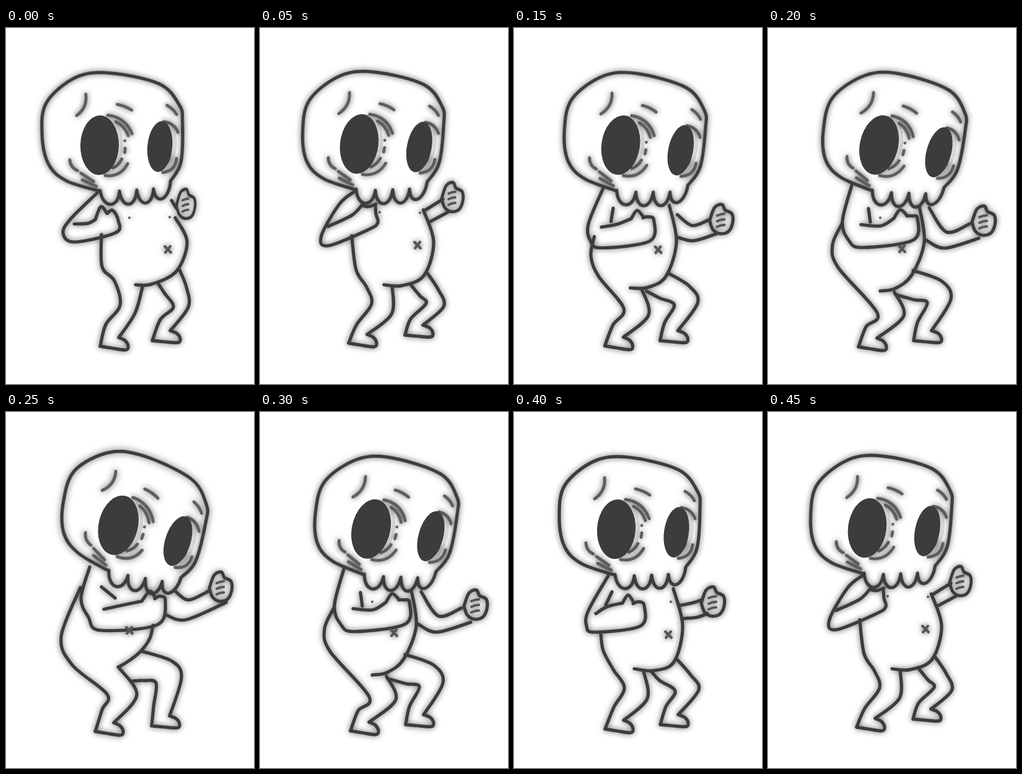
Recreate the animation shown at these times as an HTML page. Size 400x574 px, loop 0.5 s.

```html
<!DOCTYPE html>
<html lang="en">
<head>
<meta charset="utf-8">
<title>Dancing skull</title>
<style>
  html, body { margin: 0; width: 100%; height: 100%; overflow: hidden; background: #fff; }
  #strip { display: block; position: absolute; left: 0; top: 0; width: 2400px; height: 574px; animation: play .5s step-end infinite; }
  /* six poses side by side, played there and back */
  @keyframes play {
    0% { transform: translateX(0); }
    10%, 90% { transform: translateX(-400px); }
    20%, 80% { transform: translateX(-800px); }
    30%, 70% { transform: translateX(-1200px); }
    40%, 60% { transform: translateX(-1600px); }
    50% { transform: translateX(-2000px); }
  }
  path { fill: none; stroke: #3c3c3c; stroke-width: 5.2; stroke-linecap: round; stroke-linejoin: round; }
  .mark { stroke: #5c5c5c; stroke-width: 4.8; }
  .fine { stroke: #555; stroke-width: 4; }
  .glow { filter: drop-shadow(0 0 5px rgba(60, 60, 60, .85)); }
  ellipse { fill: #3c3c3c; }
  .shade { opacity: .2; }
</style>
</head>
<body>
<svg id="strip" viewBox="0 0 2400 574"></svg>
<script>
const nums = s => s.split(' ').map(Number);
const path = (d, cls = '') => `<path class="${cls}" d="${d}"/>`;

// Smooth stroke through "x y" points.
function curve(text) {
  const p = [], n = nums(text);
  while (n.length) p.push(n.splice(0, 2));
  return p.slice(1).reduce((d, b, i) => {
    const a = p[i], before = p[i - 1] || a, after = p[i + 2] || b;
    const c1 = a.map((v, k) => v + (b[k] - before[k]) / 6);
    const c2 = b.map((v, k) => v - (after[k] - a[k]) / 6);
    return d + `C${c1} ${c2} ${b}`;
  }, 'M' + p[0]);
}

// Bent line: the control point sits sideways of the middle.
function arc(x, y, u, v, bend = 0) {
  return `M${x} ${y}Q${(x + u) / 2 + bend * (v - y)} ${(y + v) / 2 - bend * (u - x)} ${u} ${v + .01}`;
}

const tooth = (x, y, u, v) => `M${x} ${y}C${x + 3} ${y + 29} ${u - 3} ${v + 29} ${u} ${v}`;

const skull = curve('163 263 110 245 82 218 73 170 82 118 130 79 185 73 265 93 296 128 300 155 295 220 277 250');
const teeth = tooth(163, 262, 194, 264) + tooth(194, 264, 222, 263) + tooth(222, 263, 249, 262) + tooth(249, 262, 277, 250);
const leftRings = arc(180, 141, 218, 172, .3) + arc(193, 152, 212, 175, .2) + arc(172, 238, 209, 220, -.35) + arc(185, 226, 200, 212, -.2);
const rightRings = arc(270, 154, 292, 172, .3) + arc(265, 236, 288, 214, -.4) + arc(270, 222, 277, 208, -.2);
const brows = arc(146, 106, 130, 140, .3) + arc(196, 124, 219, 134, .1) + arc(276, 128, 291, 143, .15);
const cheeks = arc(116, 211, 128, 229, -.3) + arc(133, 233, 153, 247) + arc(135, 244, 157, 255);
const nose = arc(206, 183, 206, 183) + arc(206, 195, 205, 202);

function socket(x, y, rx, ry, tilt) {
  const oval = (dx, cls) =>
    `<ellipse class="${cls}" rx="${rx}" ry="${ry}" transform="translate(${x + dx} ${y}) rotate(${tilt})"/>`;
  return oval(7, 'shade') + oval(0, '');
}

// The head only shifts (x, y) and leans (sideways, along).
function head(text) {
  const [x, y, lean, roll] = nums(text);
  return `<g transform="matrix(1 ${roll} ${lean} 1 ${x - 190 * lean} ${y - 200 * roll})"><g class="glow">` +
    path(skull + teeth) + path(leftRings + rightRings + brows + cheeks + nose, 'mark') + '</g>' +
    socket(165, 189, 31, 48, 4) + socket(262, 194, 20, 41, 8) + '</g>';
}

function fist(text) {
  const [x, y, wide] = nums(text);
  const fingers = [18, 27, 36].map(h => arc(12, h, 24, h - 3, .1)).join('');
  return `<g transform="translate(${x} ${y}) scale(${wide} 1)">` +
    path(curve('0 26 8 5 20 0 25 9 36 15 37 30 30 44 16 47 5 40 0 26')) + path(fingers, 'fine') + '</g>';
}

// Back of a leg down to the heel, the foot, then up the other side.
function leg(down, up, tilt) {
  const [x, y] = nums(down).slice(-2);
  const foot = path(curve('0 0 18 3 41 6 45 0 40 -9 30 -14'));
  const a = tilt * Math.PI / 180;
  const ankle = [x + 30 * Math.cos(a) + 14 * Math.sin(a), y + 30 * Math.sin(a) - 14 * Math.cos(a)];
  return path(curve(down) + curve(ankle.join(' ') + ' ' + up)) +
    `<g transform="translate(${x} ${y}) rotate(${tilt})">${foot}</g>`;
}

function navel(text) {
  const [x, y] = nums(text);
  return arc(x - 5, y - 5, x + 5, y + 5) + arc(x + 4, y - 5, x - 4, y + 5);
}

const dot = text => { const [x, y] = nums(text); return arc(x, y, x, y); };

function figure(p, i) {
  const thumbEnd = p.thumb.split(' ').slice(-2).join(' ');
  const strokes = [p.belly, p.arm, p.thumb, thumbEnd + ' ' + p.fore, p.reachTop, p.reachLow, p.crease];
  const spots = navel(p.navel) + (p.dots || []).map(dot).join('');
  return `<g transform="translate(${i * 400})"><g class="glow">` +
    path(strokes.filter(Boolean).map(curve).join('')) + leg(p.backLeg, p.backIn, 0) + leg(p.frontLeg, p.frontOut, -4) +
    fist(p.fist) + path(spots, 'fine') + '</g>' + head(p.head) + '</g>';
}

function mix(a, b, t) {
  const out = {};
  for (const key in a) {
    if (key === 'dots' || !b[key]) continue;
    const to = nums(b[key]);
    out[key] = nums(a[key]).map((v, i) => v + (to[i] - v) * t).join(' ');
  }
  return out;
}

const upright = {
  head: '-14 -1 .04 -.03',
  arm: '147 266 105 307 92 330 110 345 177 330 181 310 172 294 163 299',
  thumb: '163 299 153 288 144 309',
  fore: '132 315 110 316',
  reachTop: '267 278 275 291',
  fist: '275 260 .8',
  belly: '273 306 292 345 275 392 235 413 209 414',
  backLeg: '154 333 155 385 175 408 184 447 161 478 152 513',
  backIn: '208 460 220 418',
  frontLeg: '246 413 256 428 270 450 249 470 236 504',
  frontOut: '294 450 291 418 280 390',
  navel: '261 357',
  dots: ['199 306', '264 305']
};

const turning = {
  head: '0 0 0 0',
  arm: '152 264 120 320 117 345 130 355 204 345 210 312 201 306 192 309',
  thumb: '193 307 184 295 175 308',
  fore: '150 314 132 325',
  crease: '158 290 148 311',
  reachTop: '267 312 287 308 303 303',
  reachLow: '273 333 295 331 312 325',
  fist: '302 282 1',
  belly: '257 285 272 345 258 403 225 417 194 414',
  backLeg: '140 357 144 385 160 415 178 445 161 476 147 511',
  backIn: '215 462 209 418',
  frontLeg: '222 419 235 433 260 450 245 475 236 504',
  frontOut: '298 448 285 424 264 400',
  navel: '249 359',
  dots: ['253 306']
};

const crouched = {
  head: '14 2 -.12 .07',
  arm: '135 254 120 312 130 342 152 354 234 342 241 307 232 303 224 303',
  thumb: '224 302 213 293 203 307',
  fore: '182 319 150 317',
  crease: '162 291 165 313',
  reachTop: '260 290 288 329 325 316',
  reachLow: '255 342 285 355 340 339',
  fist: '329 287 1',
  belly: '244 287 252 345 232 398 205 420 181 424',
  backLeg: '119 316 104 350 113 386 176 459 158 482 146 514',
  backIn: '219 464 204 426',
  frontLeg: '206 430 235 438 257 443 241 475 235 504',
  frontOut: '295 437 280 408 234 391',
  navel: '216 356',
  dots: ['181 306']
};

const lowest = {
  head: '16 1 -.18 .21',
  arm: '135 250 121 300 133 331 152 352 244 343 257 304 248 297 240 301',
  thumb: '241 300 232 289 219 305',
  fore: '190 311 158 318',
  crease: '154 282 176 300',
  reachTop: '272 288 294 303 328 288',
  reachLow: '258 327 290 335 355 307',
  fist: '328 258 .97',
  belly: '237 344 232 365 218 385 200 400 182 411',
  backLeg: '120 283 89 362 107 408 163 455 155 480 144 515',
  backIn: '211 456 181 411',
  frontLeg: '203 434 222 433 242 437 238 475 235 506',
  frontOut: '283 428 268 402 220 386',
  navel: '199 352'
};

const rising = {
  ...mix(upright, turning, .6),
  head: '-5 -2 -.04 0',
  arm: '152 264 128 284 99 335 110 351 175 325 190 314 187 300 186 284',
  thumb: '187 284 175 288 164 286',
  fore: '148 302 110 320',
  reachTop: '266 294 295 276',
  reachLow: '275 312 303 297',
  fist: '293 249 .92',
  backLeg: '148 335 155 390 172 418 180 445 156 478 143 508',
  frontLeg: '244 415 258 432 268 444 243 469 234 495',
  navel: '254 350',
  dots: ['193 297', '258 298']
};

const poses = [upright, rising, turning, mix(turning, crouched, .5), crouched, lowest];
document.getElementById('strip').innerHTML = poses.map(figure).join('');
</script>
</body>
</html>
```
